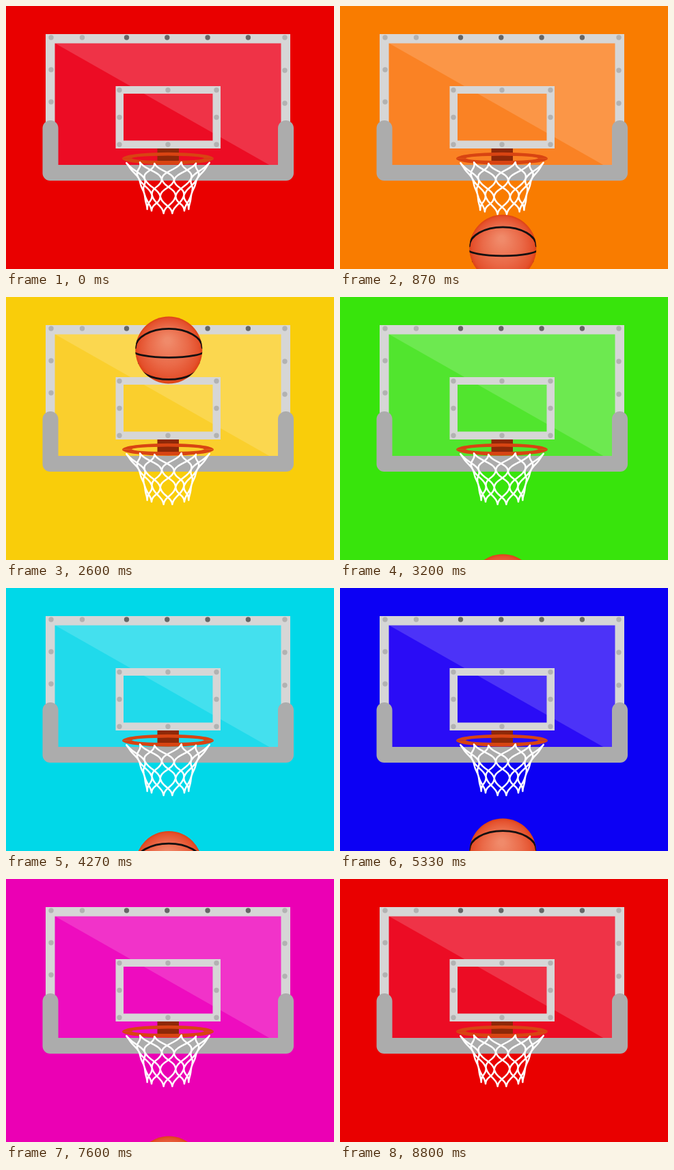
Animation, 480 px wide and 384 px high, one loop 8940 ms. Source, as an HTML page with a canvas:

```html
<!DOCTYPE html>
<html lang="en">
<head>
<meta charset="utf-8">
<title>Basketball hoop</title>
<style>
  html, body { margin: 0; width: 100%; height: 100%; overflow: hidden; background: #e90000; }
  canvas { display: block; width: 100vw; height: 100vh; }
</style>
</head>
<body>
<canvas id="stage" width="480" height="384"></canvas>
<script>
const ctx = document.getElementById('stage').getContext('2d');
const LOOP = 8940, STEP = 200 / 3, LAST = 132, DROP = 1100;
const PI = Math.PI, TAU = PI * 2;
const WALLS = ['#e90000', '#f97c00', '#f9cd0a', '#38e40c', '#00d8e8', '#0c00f4', '#6200da', '#eb00b4'];

const clamp = x => Math.max(0, Math.min(1, x));
const smooth = x => { x = clamp(x); return x * x * (3 - 2 * x); };
const mix = (a, b, k) => a + (b - a) * k;

function rect(x, y, w, h, color) {
  ctx.fillStyle = color;
  ctx.fillRect(x, y, w, h);
}

function dot(x, y, color = '#b2b2b2') {
  ctx.fillStyle = color;
  ctx.beginPath();
  ctx.arc(x, y, 3.7, 0, TAU);
  ctx.fill();
}

function frame(x, y, w, h, side, top, bottom) {
  ctx.fillStyle = '#d6d6d6';
  ctx.beginPath();
  ctx.rect(x, y, w, h);
  ctx.rect(x + side, y + top, w - 2 * side, h - top - bottom);
  ctx.fill('evenodd');
}

function glass() {
  ctx.globalCompositeOperation = 'screen';
  rect(71, 54, 333, 179, 'rgb(32, 12, 36)');
  ctx.globalCompositeOperation = 'source-over';
  ctx.fillStyle = 'rgba(255, 255, 255, 0.16)';
  ctx.beginPath();
  ctx.moveTo(71, 54);
  ctx.lineTo(404, 54);
  ctx.lineTo(404, 233);
  ctx.lineTo(387, 233);
  ctx.fill();
}

function padding() {
  ctx.fillStyle = '#acacac';
  ctx.beginPath();
  ctx.moveTo(53.5, 178.5);
  ctx.arc(65, 178.5, 11.5, PI, TAU);
  ctx.lineTo(76.5, 232);
  ctx.lineTo(398, 232);
  ctx.arc(409.5, 178.5, 11.5, PI, TAU);
  ctx.arcTo(421, 255, 409, 255, 11);
  ctx.arcTo(53.5, 255, 53.5, 243, 11);
  ctx.fill();
}

function bolts() {
  dot(111.5, 46);
  for (let i = 0; i < 3; i++) {
    dot(66, 46 + 47 * i);
    dot(408, 46 + 48 * i);
  }
  for (let i = 0; i < 4; i++) dot(176.5 + 59.3 * i, 46, '#666');
  for (let i = 0; i < 9; i++) {
    if (i !== 4) dot(166 + 71 * (i % 3), 122.7 + 39.8 * Math.floor(i / 3));
  }
}

function board() {
  glass();
  frame(58, 41, 358, 200, 13.5, 13.5, 0);
  padding();
  frame(160.5, 117, 153.5, 91, 11.5, 11, 11.5);
  bolts();
  rect(221.5, 208, 31.5, 18, '#8e2808');
}

// half of the ring, from the given angle
function rim(start) {
  ctx.fillStyle = '#d84412';
  ctx.beginPath();
  ctx.ellipse(237, 222.7, 67, 9, 0, start, start + PI);
  ctx.ellipse(237, 222.3, 53, 3.7, 0, start + PI, start, true);
  ctx.fill();
}

// free fall, caught by the net, then falling on
function ballY(p) {
  const g = 0.00079;
  if (p < 600) return -49 + g * p * p;
  if (p < 700) return 305 - 69.6 * Math.pow(1 - (p - 600) / 100, 1.36);
  const d = p - 700;
  return 305 + 0.161 * d + g * d * d;
}

// seam as half an ellipse; negative bend arches upwards
function seam(y, rx, bend) {
  ctx.beginPath();
  ctx.ellipse(0, y, rx, Math.abs(bend), 0, 0, PI, bend < 0);
  ctx.stroke();
}

function ball(y) {
  ctx.save();
  ctx.translate(238.3, y);
  const skin = ctx.createRadialGradient(-2, -14, 4, 0, 0, 49);
  skin.addColorStop(0, '#f08a6a');
  skin.addColorStop(0.55, '#ea6a48');
  skin.addColorStop(0.9, '#e4502c');
  skin.addColorStop(1, '#de4214');
  ctx.fillStyle = skin;
  ctx.beginPath();
  ctx.arc(0, 0, 49, 0, TAU);
  ctx.fill();
  ctx.clip();
  ctx.strokeStyle = '#141010';
  ctx.lineWidth = 2.8;
  seam(-3, 49, -28);
  seam(1, 52, 10);
  seam(20, 46, 23);
  ctx.restore();
}

// strands wind both ways round a tapering tube and meet in knots
function net(stretch) {
  const count = 6, rows = 3, turn = rows * PI / count, offset = 0.2;
  ctx.strokeStyle = '#fff';
  ctx.lineWidth = 2.5;
  ctx.lineCap = ctx.lineJoin = 'round';
  ctx.beginPath();
  for (let n = 0; n < count * 2; n++) {
    const way = n % 2 ? 1 : -1;
    const start = offset + turn + Math.floor(n / 2) * TAU / count;
    for (let i = 0; i <= 30; i++) {
      const v = i / 30, wave = TAU * rows;
      const angle = start + way * turn * (v - 0.7 * Math.sin(wave * v) / wave);
      const u = Math.sin(angle);
      const width = mix(32 + 30 * (1 - v) ** 2, 45 + 16 * (1 - v) ** 3, stretch);
      const x = 237 + 2 * v * stretch + u * width;
      const y = mix(229 + Math.cos(angle), 303 + 9 * stretch - 7 * u * u, v);
      i ? ctx.lineTo(x, y) : ctx.moveTo(x, y);
    }
  }
  ctx.stroke();
}

function draw(time) {
  const tick = Math.min(LAST, Math.floor((time % LOOP + 4) / STEP));
  const phase = tick * STEP % DROP;
  // the wall changes as the ball reaches the net
  const wall = Math.floor((2 * tick + 13) / 33) % WALLS.length;
  const stretch = smooth((phase - 560) / 107) * (1 - smooth((phase - 760) / 140));

  rect(0, 0, 480, 384, WALLS[wall]);
  board();
  rim(PI);
  if (tick < LAST) ball(ballY(phase));
  rim(0);
  net(stretch);
}

const begin = performance.now();
function loop() {
  draw(performance.now() - begin);
  requestAnimationFrame(loop);
}
loop();
</script>
</body>
</html>
```
